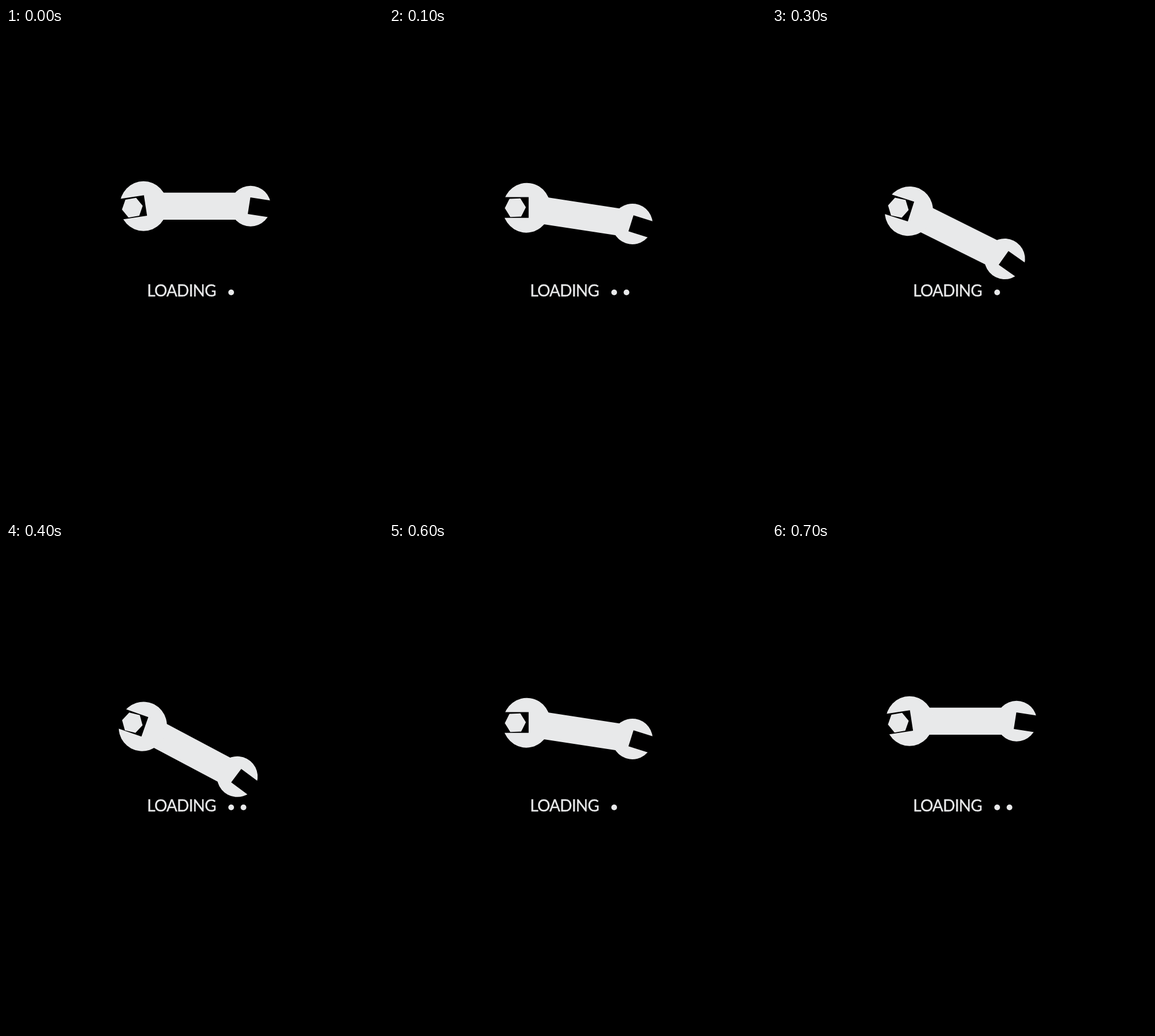
Recreate the animation shown at these times as an HTML page. Size 658 by 851 pixels, loop 0.8 s.

```html
<!DOCTYPE html>
<html lang="en">
<head>
<meta charset="utf-8">
<title>Loading</title>
<style>
  html, body { margin: 0; width: 100%; height: 100%; overflow: hidden; background: #000; }
  svg { display: block; fill: #e8e9ea; }
  text { font: 28px Lato, "Open Sans", sans-serif; letter-spacing: -0.7px; stroke: #e8e9ea; stroke-width: 0.4px; }
  .gap { fill: #000; }
</style>
</head>
<body>
<svg width="658" height="851" viewBox="0 0 658 851">
  <g id="wrench">
    <rect x="250" y="287.7" width="165" height="47.3"/>
    <ellipse cx="240" cy="311.2" rx="41.7" ry="43.5"/>
    <circle cx="426.8" cy="311.2" r="35.5"/>
    <path class="gap" d="M426.5 296 L475 303.4 L470.5 332.4 L422 325Z"/>
    <path class="gap" d="M-30 -18H23.2V18.2H-30Z" transform="translate(220.5 313.5) rotate(-8.7)"/>
  </g>
  <path id="bolt" d="M-18.4 0L-9.5 -15.9H9.5L18.4 0L9.5 15.9H-9.5Z"/>
  <text x="246.2" y="469.4">LOADING</text>
  <g id="dots">
    <circle cx="393" cy="462" r="5"/>
    <circle cx="414.5" cy="462" r="5"/>
    <circle cx="436" cy="462" r="5"/>
  </g>
</svg>
<script>
  const STEP = 100;
  const angles = [0, 8.7, 17.5, 26.5, 28, 18.7, 8.7, 0];
  const [wrench, bolt, dots] = ["wrench", "bolt", "dots"].map(id => document.getElementById(id));
  const start = performance.now();

  function draw(now) {
    const step = Math.floor(Math.max(0, now - start) / STEP) % angles.length;
    const angle = angles[step];
    wrench.setAttribute("transform", `rotate(${angle} 220.5 313.5)`);
    // the bolt follows with a little slack
    bolt.setAttribute("transform", `translate(220.5 314) rotate(${angle * 0.85 - 10})`);
    [...dots.children].forEach((dot, i) =>
      dot.setAttribute("visibility", i <= step % 3 ? "visible" : "hidden"));
    requestAnimationFrame(draw);
  }
  draw(start);
</script>
</body>
</html>
```
